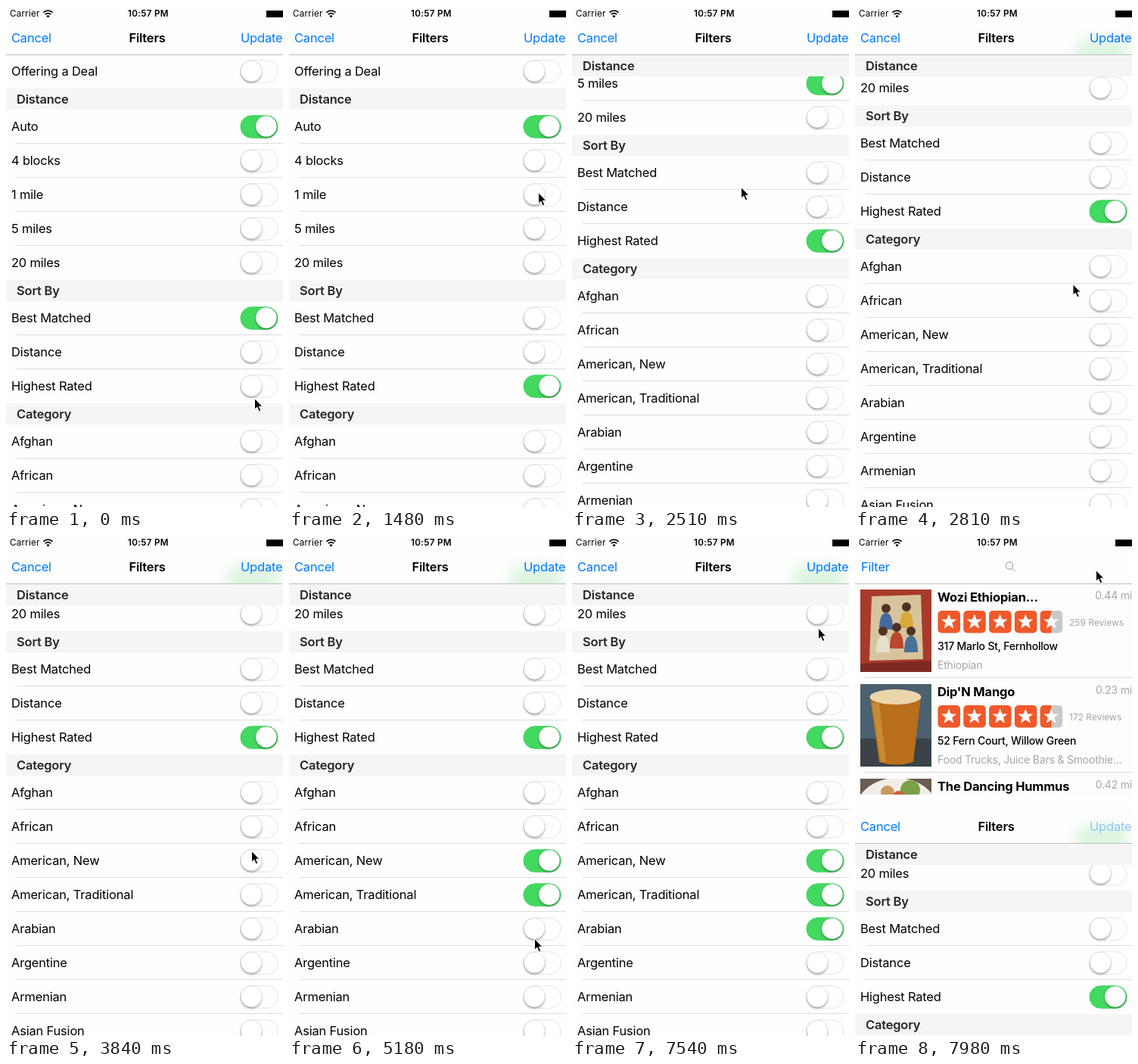
These frames come from a looping animation (366x662 px, 8000 ms). An HTML page:

```html
<!DOCTYPE html>
<html lang="en">
<head>
<meta charset="utf-8">
<title>Filters</title>
<style>
html, body { margin: 0; width: 100%; height: 100%; overflow: hidden; }
body { position: relative; background: #fdfdfd; color: #000; font: 16.5px/20px Inter, sans-serif; letter-spacing: -.2px; }
body * { box-sizing: border-box; white-space: nowrap; }
#home, #sheet, #list { position: absolute; left: 0; top: 0; width: 366px; height: 662px; overflow: hidden; }
#home { z-index: 0; }
#sheet { z-index: 1; }
#sheet, #list { background: #fefefe; }
.abs, .nav, .nav span, #home .row *, #status, #status * { position: absolute; }
.nav { left: 0; top: 0; width: 366px; height: 65px; overflow: hidden; border-bottom: 1px solid #bdbdbf; background: #fefefe; z-index: 2; }
.nav span { top: 32px; }
.nav b { position: absolute; top: 32px; left: 0; width: 373px; text-align: center; font-weight: 600; }
.blue { color: #007aff; }
#glow { left: 290px; top: 274px; width: 72px; height: 40px; border-radius: 20px; background: #def5e0; filter: blur(8px); }

.spacer { height: 64px; }
.head { position: sticky; top: 64.5px; z-index: 1; height: 28px; padding-left: 14px; background: #f5f5f5; color: #262626; font-weight: 600; line-height: 28px; }
.item { position: relative; height: 45px; padding-left: 7px; line-height: 45px; }
.line::after { content: ""; position: absolute; left: 14px; right: 0; bottom: 0; height: 1px; background: #dcdcde; }
.switch { position: absolute; left: 309px; top: 7px; width: 51px; height: 31px; border-radius: 16px; background: #fefefe; border: 1.5px solid #e4e4e4; transform: scale(.985); }
.switch::after { content: ""; position: absolute; left: 0; top: 0; width: 28px; height: 28px; border-radius: 50%; background: #fff; box-shadow: 0 2px 3px rgba(0, 0, 0, .3), 0 0 1px rgba(0, 0, 0, .35); }
.switch.on { background: #43d85f; border-color: #43d85f; }
.switch.on::after { left: 20px; }

#home .row { position: relative; height: 125px; }
#home .row > svg { left: 7px; top: 8px; }
#home .row .stars { left: 109px; top: 35px; }
.title { left: 109px; top: 8px; font-weight: 700; }
.far { right: 0; top: 6px; font-size: 14px; color: #a6a6a8; }
.count { left: 283px; top: 42px; font-size: 12px; letter-spacing: 0; color: #a6a6a8; }
.street { left: 109px; top: 73px; font-size: 14px; font-weight: 500; }
.kind { left: 109px; top: 98px; font-size: 14px; color: #a6a6a8; }

#status { left: 0; top: 0; width: 366px; height: 20px; font-size: 11.7px; letter-spacing: .2px; z-index: 3; }
#cursor { position: absolute; left: -1px; top: -1px; overflow: visible; z-index: 4; }
</style>
</head>
<body>
<div id="home">
  <div class="nav">
    <span class="blue" style="left:8px">Filter</span>
    <svg class="abs" style="left:197px;top:34px" width="16" height="16" fill="none" stroke="#8b8b8f"><circle cx="7" cy="6.5" r="4.7"/><path d="M10.4 10L14.5 14"/></svg>
  </div>
  <div class="spacer"></div>
</div>

<div id="sheet">
  <div id="list"><div class="spacer"></div></div>
  <div class="nav">
    <i class="abs" id="glow"></i>
    <span class="blue" style="left:7px">Cancel</span>
    <b>Filters</b>
    <span class="blue" id="update" style="left:310px">Update</span>
  </div>
</div>

<div id="status">
  <span style="left:5px">Carrier</span>
  <svg style="left:48px;top:4px" width="15" height="12" fill="none" stroke="#000" stroke-width="1.8">
    <path d="M1.5 4.6a8.5 8.5 0 0 1 12 0M3.8 7.1a5.2 5.2 0 0 1 7.4 0"/><path d="M7.5 11.5L5.4 9.2a3 3 0 0 1 4.2 0z" fill="#000" stroke="none"/>
  </svg>
  <span style="left:161px;font-weight:600;letter-spacing:.3px">10:57 PM</span>
  <i style="left:343.5px;top:6px;width:23px;height:9px;background:#000"></i>
</div>

<svg id="cursor" width="12" height="19"><path d="M.5 .5V15.2L3.8 12.1L6.2 17.8L8.8 16.7L6.4 11.2H10.8Z" stroke="#fff"/></svg>

<script>
const LOOP = 8000, TICK = 147.5;
const $ = id => document.getElementById(id);

// A plain string is a section; a row is [label, tick turned on, tick turned off].
const NEVER = 99;
const entries = [
  ['Offering a Deal'],
  'Distance', ['Auto', 0, 13], ['4 blocks'], ['1 mile'], ['5 miles', 13], ['20 miles'],
  'Sort By', ['Best Matched', 0, 8], ['Distance'], ['Highest Rated', 8],
  'Category', ['Afghan'], ['African'], ['American, New', 27], ['American, Traditional', 30],
  ['Arabian', 43], ['Argentine'], ['Armenian'], ['Asian Fusion']
];

const switches = [];
entries.forEach((entry, i) => {
  const div = document.createElement('div');
  $('list').append(div);
  if (typeof entry === 'string') {
    div.className = 'head';
    div.textContent = entry;
    return;
  }
  const [label, on = NEVER, off = NEVER] = entry;
  div.className = Array.isArray(entries[i + 1]) ? 'item line' : 'item';
  div.textContent = label;
  const el = document.createElement('i');
  div.append(el);
  switches.push({ el, on, off });
});

const starPath = 'M14.5 4.5l2.8 7h7.2l-5.7 4.6 2.1 7.4-6.4-4.3-6.4 4.3 2.1-7.4-5.7-4.6h7.2z';
const star = i => `<g transform="translate(${i * 33.8 + .5} 1)">
  <rect width="29.5" height="29.5" rx="5" fill="${i < 4 ? '#f0592a' : '#c9c9c9'}"/>
  ${i < 4 ? '' : '<path d="M14.7 0H5a5 5 0 0 0-5 5v19.5a5 5 0 0 0 5 5h9.7z" fill="#f0592a"/>'}
  <path d="${starPath}" fill="#fff"/></g>`;
const stars = `<svg class="stars" width="168" height="32">${[0, 1, 2, 3, 4].map(star).join('')}</svg>`;

const person = (x, y, c) => `<circle cx="${x}" cy="${y}" r="6" fill="#4e3325"/><path d="M${x - 9} ${y + 28}q0-22 9-22t9 22z" fill="${c}"/>`;
const photos = [
  `<rect width="94" height="109" fill="#a83a2c"/><path d="M15 9L80 7L83 92L12 94Z" fill="#d8c49c"/>
   ${person(34, 25, '#446b9e')}${person(61, 23, '#d8a93a')}${person(30, 55, '#e6dfca')}${person(48, 50, '#b94732')}${person(67, 55, '#4a6f94')}
   <path d="M0 98L94 94V109H0Z" fill="#7d2a24"/>`,
  `<rect width="94" height="109" fill="#4b6070"/><path d="M0 72H94V109H0Z" fill="#3b4348"/>
   <path d="M13 17H80L70 103Q47 110 25 103Z" fill="#b96f1c"/><path d="M25 25L34 103H27L15 25Z" fill="#c98a35"/>
   <ellipse cx="46.5" cy="17" rx="34" ry="10" fill="#ead6aa"/>`,
  `<rect width="94" height="109" fill="#6a5c50"/><ellipse cx="48" cy="46" rx="56" ry="47" fill="#f1eeea"/>
   <circle cx="36" cy="18" r="9" fill="#c99a5c"/><circle cx="66" cy="15" r="13" fill="#7ba048"/><circle cx="51" cy="24" r="8" fill="#c8603f"/>`
];
const places = [
  ['Wozi Ethiopian...', '0.44 mi', '259 Reviews', '317 Marlo St, Fernhollow', 'Ethiopian'],
  ["Dip'N Mango", '0.23 mi', '172 Reviews', '52 Fern Court, Willow Green', 'Food Trucks, Juice Bars &amp; Smoothie...'],
  ['The Dancing Hummus', '0.42 mi', '96 Reviews', '8 Alder Row, Willow Green', 'Middle Eastern']
];
$('home').insertAdjacentHTML('beforeend', places.map(([title, far, count, street, kind], i) => `
  <div class="row line"><svg width="94" height="109">${photos[i]}</svg>${stars}
  <span class="title">${title}</span><span class="far">${far}</span><span class="count">${count}</span>
  <span class="street">${street}</span><span class="kind">${kind}</span></div>`).join(''));

// Keyframes are [tick, ...values].
const pointer = [
  [0, 329, 519], [1, 329, 520], [4, 329, 520], [5, 329, 508], [6, 329, 498], [8, 329, 498],
  [10, 330, 247], [12, 330, 286], [13, 330, 286], [15, 236, 432], [17, 224, 240], [18, 224, 240],
  [20, 353, 496], [21, 353, 496], [22, 345, 470], [24, 324, 410], [25, 324, 410], [26, 325, 418],
  [27, 325, 418], [29, 331, 470], [31, 330, 488], [32, 330, 488], [34, 337, 524], [35, 325, 534],
  [36, 325, 534], [37, 330, 550], [38, 326, 530], [39, 329, 510], [44, 329, 510], [45, 350, 557],
  [47, 354, 430], [52, 319, 47]
];
const scroll = [[15, 0], [16, 92], [17, 192.5], [18, 220], [19, 231], [20, 235]];
const slide = [[52, 0], [53, 110], [54, 343]];

function at(keys, k) {
  const i = keys.findIndex(key => key[0] > k);
  if (i < 0) return keys[keys.length - 1].slice(1);
  if (i === 0) return keys[0].slice(1);
  const [a, b] = [keys[i - 1], keys[i]];
  const f = (k - a[0]) / (b[0] - a[0]);
  return a.slice(1).map((v, j) => v + (b[j + 1] - v) * f);
}

function draw(now) {
  // The picture advances in even steps.
  const k = Math.floor((now % LOOP) / TICK + .07);
  const [x, y] = at(pointer, k);
  const [offset] = at(scroll, k);
  $('cursor').style.transform = `translate(${x}px, ${y}px)`;
  $('list').scrollTop = offset;
  // The lit "5 miles" switch shines faintly through the bar.
  $('glow').style.transform = `translateY(${-offset}px)`;
  $('sheet').style.transform = `translateY(${at(slide, k)[0]}px)`;
  $('update').style.opacity = k < 53 ? 1 : .4;
  for (const { el, on, off } of switches) el.className = k >= on && k < off ? 'switch on' : 'switch';
}

const start = performance.now();
function loop() {
  draw(performance.now() - start);
  requestAnimationFrame(loop);
}
loop();
</script>
</body>
</html>
```
